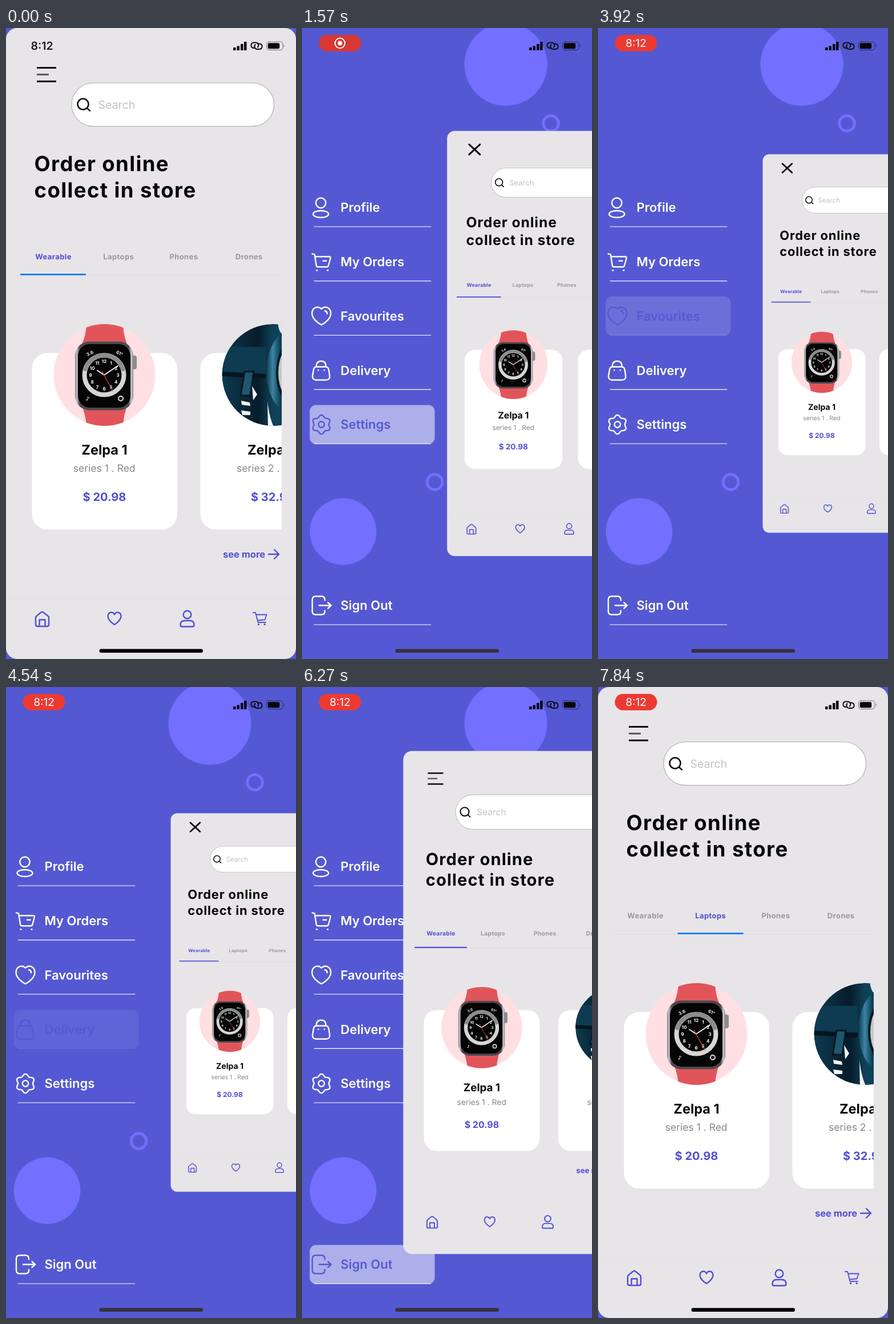
Animation, 508 px wide and 1102 px high, one loop 7990 ms. Source, as an HTML page:

```html
<!DOCTYPE html>
<html lang="en">
<head>
<meta charset="utf-8">
<title>Shop drawer menu</title>
<style>
html, body { margin: 0; width: 100%; height: 100%; overflow: hidden; background: #5459d3; }
svg { display: block; width: 508px; height: 1102px; font-family: Inter, Roboto, sans-serif; text-rendering: geometricPrecision; }
.line { fill: none; stroke-linecap: round; stroke-linejoin: round; }
.mid { text-anchor: middle; }
.head { font-size: 36.5px; font-weight: 700; letter-spacing: 1.4px; fill: #060509; }
.tab { font-size: 13px; font-weight: 700; letter-spacing: .4px; }
.name { font-size: 23.5px; font-weight: 700; fill: #0a0a0c; }
.kind { font-size: 17.5px; fill: #88868a; }
.price { font-size: 20px; font-weight: 700; fill: #524fd5; }
.item { font-size: 22px; font-weight: 600; }
</style>
</head>
<body>
<svg viewBox="0 0 508 1102">
  <defs>
    <clipPath id="listClip"><rect x="25" y="500" width="458" height="400"/></clipPath>
    <clipPath id="redClip"><circle cx="172.5" cy="606" r="89"/></clipPath>
    <clipPath id="blueClip"><circle cx="467.5" cy="606" r="89"/></clipPath>
    <linearGradient id="steel">
      <stop stop-color="#7c7c80"/><stop offset=".03" stop-color="#c4c4c7"/><stop offset=".08" stop-color="#4a4a4d"/>
      <stop offset=".92" stop-color="#4a4a4d"/><stop offset=".97" stop-color="#cfcfd2"/><stop offset="1" stop-color="#7c7c80"/>
    </linearGradient>
    <linearGradient id="teal">
      <stop stop-color="#0e3a51"/><stop offset=".35" stop-color="#061c2a"/><stop offset=".5" stop-color="#0f4159"/>
    </linearGradient>
    <linearGradient id="case">
      <stop stop-color="#0d3a50"/><stop offset=".12" stop-color="#3c85a3"/><stop offset=".25" stop-color="#0f4259"/>
    </linearGradient>
  </defs>

  <rect width="508" height="1102" fill="#5459d3"/>
  <g fill="#736fff"><circle cx="357" cy="63.5" r="72.5"/><circle cx="72" cy="879.5" r="58.3"/></g>
  <g class="line" stroke="#736fff" stroke-width="4.8"><circle cx="436" cy="166.5" r="13.3"/><circle cx="232.5" cy="793" r="13.3"/></g>
  <g id="items"></g>

  <g id="panel">
    <rect width="508" height="1102" rx="19.5" fill="#e7e5e8"/>
    <g id="button" class="line" stroke="#0b0a0d">
      <g id="burger" stroke-linecap="butt" stroke-width="3">
        <path d="M54 69.5H88M54 93.3H88"/><path d="M54 81.3H75" stroke="#57555a"/>
      </g>
      <path id="cross" d="M57.5 68.5L85.5 94.5M85.5 68.5L57.5 94.5" stroke-width="4.6"/>
    </g>
    <rect x="115" y="96" width="354.5" height="75.7" rx="37.8" fill="#fff" stroke="#b8aeb4" stroke-width="1.2"/>
    <path class="line" d="M125.5 133a9.5 9.5 0 1 0 19 0a9.5 9.5 0 1 0-19 0M142 140l5 4.5" stroke="#08080a" stroke-width="2.5"/>
    <text x="161.5" y="141" font-size="19.5" fill="#c5c1c8">Search</text>
    <text class="head" x="49.5" y="249.5">Order online</text>
    <text class="head" x="49.5" y="295.5">collect in store</text>
    <g id="tabs"></g>
    <path d="M25 432H483" stroke="#dcdadf"/>
    <rect id="mark" x="25" y="429" width="115" height="2.8"/>

    <g clip-path="url(#listClip)">
      <g fill="#fff"><rect x="45.5" y="567.5" width="254.5" height="308.5" rx="27"/><rect x="340.5" y="567.5" width="254.5" height="308.5" rx="27"/></g>
      <g clip-path="url(#redClip)">
        <circle cx="172.5" cy="606" r="89" fill="#ffdfe2"/>
        <path d="M141 512H205Q205 535 212 552H133Q141 535 141 512ZM133 660H212Q205 680 205 700H141Q141 680 133 660Z" fill="#e1555a"/>
        <rect x="219" y="572" width="10" height="24" rx="4" fill="#8b8b8e"/>
        <rect x="121" y="547.5" width="102" height="120" rx="25" fill="url(#steel)"/>
        <rect x="126" y="552" width="92" height="111" rx="21" fill="#050506"/>
        <circle cx="172" cy="606" r="34.5" class="line" stroke="#d6d6d7" stroke-width="8"/>
        <path class="line" d="M139 596A34.500 34.500 0 0 1 205 596" stroke="#8b8c8e" stroke-width="7"/>
        <g id="dial" fill="#fff" font-size="8" font-weight="700"></g>
        <path class="line" d="M160 598L172 606L196 590" stroke="#fff" stroke-width="1.7"/>
        <path class="line" d="M168 599L187 634" stroke="#e04444" stroke-width="1.2"/>
        <g class="mid" fill="#e4e4e4" font-size="8" font-weight="700">
          <text transform="rotate(-25 147 568)" x="147" y="571">3.6</text>
          <text transform="rotate(25 199 568)" x="199" y="571">61°</text>
          <text x="143" y="650">♪</text>
        </g>
        <circle cx="201" cy="647" r="4" class="line" stroke="#ddd" stroke-width="2"/>
      </g>
      <g clip-path="url(#blueClip)">
        <circle cx="467.5" cy="606" r="89" fill="url(#teal)"/>
        <path d="M375 557H455V604L375 600Z" fill="#0f3b52"/>
        <path d="M375 600L455 604V612L375 608Z" fill="#051520"/>
        <path d="M476 512H484V535Q477 530 476 512Z" fill="#dfe8ec"/>
        <path d="M418 600H434L428 642H411Z" fill="#1f566f" stroke="#061824" stroke-width="3"/>
        <path d="M412 651L427 654L428 660L413 658ZM412 668L428 670V676H414ZM431 625L440 640L433 650ZM458 652Q462 684 470 698H459Z" fill="#f4f7f8"/>
        <ellipse cx="503" cy="600" rx="47" ry="74" fill="url(#case)"/>
        <ellipse cx="505" cy="602" rx="32" ry="58" fill="#061c2a"/>
        <ellipse cx="505" cy="602" rx="28" ry="50" fill="#c5c9cc"/>
      </g>
      <text class="name mid" x="172.5" y="745">Zelpa 1</text>
      <text class="kind mid" x="172.2" y="775">series 1 . Red</text>
      <text class="price mid" x="172.5" y="825.5">$ 20.98</text>
      <text class="name" x="423" y="745">Zelpa 2</text>
      <text class="kind" x="404" y="775">series 2 . Blue</text>
      <text class="price" x="429" y="825.5">$ 32.98</text>
    </g>
    <text x="380" y="925" font-size="16.5" font-weight="700" fill="#524fd5">see more</text>
    <path d="M0 997.5H508" stroke="#e3e1e5"/>
    <g class="line" stroke="#524fd5" stroke-width="2.4">
      <path d="M460 919H478M470 911L478 919L470 927"/>
      <path d="M52 1030Q52 1028 54 1026.500L61.500 1020.500Q63.500 1019 65.500 1020.500L73 1026.500Q75 1028 75 1030V1042Q75 1045 72 1045H55Q52 1045 52 1042ZM58.500 1045V1033.500H68.500V1045"/>
      <path d="M190 1042C184 1038 178.500 1032 178.500 1027.500C178.500 1020 187 1018 190 1024.500C193 1018 201.500 1020 201.500 1027.500C201.500 1032 196 1038 190 1042Z"/>
      <circle cx="317.5" cy="1024.5" r="6.8"/>
      <path d="M305.500 1042.500Q305.500 1035 313 1035H322Q329.500 1035 329.500 1042.500Q329.500 1045.500 326.500 1045.500H308.500Q305.500 1045.500 305.500 1042.500Z"/>
      <path d="M433 1021H437L441.500 1038H455M438 1024.500H456.500L453.500 1033.500L440.500 1034.500" stroke-width="1.8"/>
      <path d="M442.500 1041.500h.1M453 1041.500h.1" stroke-width="3.4"/>
    </g>
  </g>

  <text id="clock" x="43.5" y="38" font-size="19.5" font-weight="600" fill="#19181b">8:12</text>
  <g id="pill">
    <rect id="pillBox" x="29.5" y="12" width="74" height="28.8" rx="14.4"/>
    <g id="rec"><circle cx="66.5" cy="26.5" r="8.7" class="line" stroke="#fff" stroke-width="2"/><circle cx="66.5" cy="26.5" r="4" fill="#fff"/></g>
    <text id="pillTime" class="mid" x="66.5" y="33.2" font-size="19" fill="#fff">8:12</text>
  </g>
  <path d="M398 34h4.500v5h-4.500zM404.500 31.500h4.500v7.500h-4.500zM411 28h4.500v11h-4.500zM417 24h4.500v15h-4.500z" fill="#060608"/>
  <path class="line" d="M436 35H433.500A4.800 4.800 0 0 1 433.500 25.500H438A4.800 4.800 0 0 1 441 33.500M442 27.500H444.500A4.800 4.800 0 0 1 444.500 37H439.500A4.800 4.800 0 0 1 436.500 29" stroke="#0c0b0e" stroke-width="2"/>
  <rect x="456.5" y="24" width="28.5" height="14.5" rx="4.2" class="line" stroke="#000" stroke-opacity=".5"/>
  <rect x="458.7" y="26.2" width="20.5" height="10.1" rx="2.3" fill="#060608"/>
  <path d="M486.800 29Q489 31 486.800 33.500Z" fill="#000" fill-opacity=".5"/>
  <rect id="bar" x="163.5" y="1084.5" width="181.5" height="6.5" rx="3.25"/>
</svg>
<script>
const LOOP = 7990, BLUE = '#5459d3', OPEN = 1362, CLOSE = 6122;
const $ = id => document.getElementById(id);
const ramp = (t, from, len) => Math.min(1, Math.max(0, (t - from) / len));
const ease = k => k < .5 ? 2 * k * k : 1 - 2 * (1 - k) ** 2;
const move = (t, from, len) => ease(ramp(t, from, len));

const gear = 'M' + Array.from({ length: 72 }, (_, i) => {
  const a = i * Math.PI / 36, r = 14.8 - 1.9 * Math.cos(6 * a);
  return (34 + r * Math.cos(a)).toFixed(1) + ' ' + (r * Math.sin(a)).toFixed(1);
}).join('L') + 'Z';

// Icons are drawn around the middle of their row; down and up are the touch times.
const items = [
  { label: 'Profile', y: 313.5, down: 2400, up: 3140,
    icon: 'M24.3-8a8.7 8.7 0 1 0 17.4 0a8.7 8.7 0 1 0-17.4 0M19.5 11.5a13.5 6 0 1 0 27 0a13.5 6 0 1 0-27 0' },
  { label: 'My Orders', y: 408.3,
    icon: 'M18-14L22-13L25 6Q25.5 9 28 9H43Q46 9 46.5 6L50-7Q50-9 47-9H23M37-1.5H42.5M25.5 15h1M44.5 15h1' },
  { label: 'Favourites', y: 503, down: 3560, up: 3850,
    icon: 'M34 15.5C27 12 17.5 4 17.5-4.5C17.5-14 27-19 34-12.5C41-19 50.5-14 50.5-4.5C50.5 4 41 12 34 15.5ZM40-9Q44-8.5 44-4' },
  { label: 'Delivery', y: 597.8, down: 4290, up: 4540,
    icon: 'M25-6H42Q46-6 47 0L48.5 10Q49 17 42 17H25Q18 17 18.5 10L20 0Q21-6 25-6ZM25-6Q25-16 33.5-16Q42-16 42-6M28.5 0h.1M39 0h.1' },
  { label: 'Settings', y: 692.5, icon: gear + 'M28.8 0a5.2 5.2 0 1 0 10.4 0a5.2 5.2 0 1 0-10.4 0' },
  { label: 'Sign Out', y: 1008.5, down: 4960, up: 5230,
    icon: 'M40-9V-10Q40-16 34-16H24Q18-16 18-10V10Q18 16 24 16H34Q40 16 40 10V9M30 0H51M45.5-5L51 0L45.5 5' }
];
$('items').innerHTML = items.map(({ label, y, icon }) => `<g transform="translate(0 ${y})">
  <rect x="13.5" y="-34" width="219" height="68" rx="11" fill="#fff" fill-opacity=".52"/>
  <path d="M21 33.5H226" stroke="#fff" stroke-width="1.2"/>
  <path class="line" d="${icon}" stroke-width="2.4"/>
  <text class="item" x="67.5" y="7.7">${label}</text></g>`).join('');
const rows = [...$('items').children];

$('tabs').innerHTML = ['Wearable', 'Laptops', 'Phones', 'Drones'].map((name, i) =>
  `<text class="tab mid" x="${83 + 114.2 * i}" y="404">${name}</text>`).join('');
const tabs = [...$('tabs').children];

$('dial').innerHTML = Array.from({ length: 12 }, (_, i) => {
  const a = (i + 1) * Math.PI / 6;
  return `<text class="mid" x="${172 + 24 * Math.sin(a)}" y="${609 - 24 * Math.cos(a)}">${i + 1}</text>`;
}).join('');

function drawItems(t) {
  let chosen = 4;
  items.forEach((it, i) => { if (t >= it.up) chosen = i; });
  items.forEach((it, i) => {
    const on = i === chosen, [box, , icon, label] = rows[i].children;
    box.style.display = on ? '' : 'none';
    icon.style.stroke = label.style.fill = on ? BLUE : '#fff';
    const pressed = it.up ? move(t, it.down, 200) - move(t, it.up, 250) : 0;
    rows[i].style.opacity = 1 - .88 * pressed;
  });
}

function drawPanel(t) {
  const open = move(t, OPEN, 300) - move(t, CLOSE, 300);
  const s = 1 - .4 * open;
  const x = 254 * (1 - s) + s * 311.5 * open, y = 551 * (1 - s);
  $('panel').setAttribute('transform', `translate(${x} ${y}) scale(${s})`);
  const crossed = t >= OPEN && t < CLOSE;
  $('burger').style.display = crossed ? 'none' : '';
  $('cross').style.display = crossed ? '' : 'none';
  $('button').setAttribute('transform', `translate(0 ${-41 * open})`);
  $('button').style.opacity = 1 - .8 * (move(t, 1130, 150) - move(t, OPEN, 200));
  $('mark').setAttribute('fill', open > .01 ? '#5051e0' : '#1a7df5');
  $('mark').setAttribute('x', 25 + 114.5 * move(t, 7480, 280));
  $('bar').setAttribute('fill', open > .01 ? '#37303b' : '#000');
  const tab = t < 7560 ? 0 : 1;
  tabs.forEach((el, i) => el.setAttribute('fill', i === tab ? '#524fd5' : '#9a989d'));
}

function drawStatus(t) {
  const shown = ramp(t, 130, 300), timed = ramp(t, 3450, 150);
  $('clock').style.opacity = 1 - shown;
  $('pill').style.opacity = shown;
  $('pillBox').setAttribute('fill', timed ? '#ec3a33' : '#d83732');
  $('rec').style.opacity = 1 - timed;
  $('pillTime').style.opacity = timed;
}

const start = performance.now();
function frame() {
  const t = (performance.now() - start) % LOOP;
  drawItems(t);
  drawPanel(t);
  drawStatus(t);
  requestAnimationFrame(frame);
}
frame();
</script>
</body>
</html>
```
